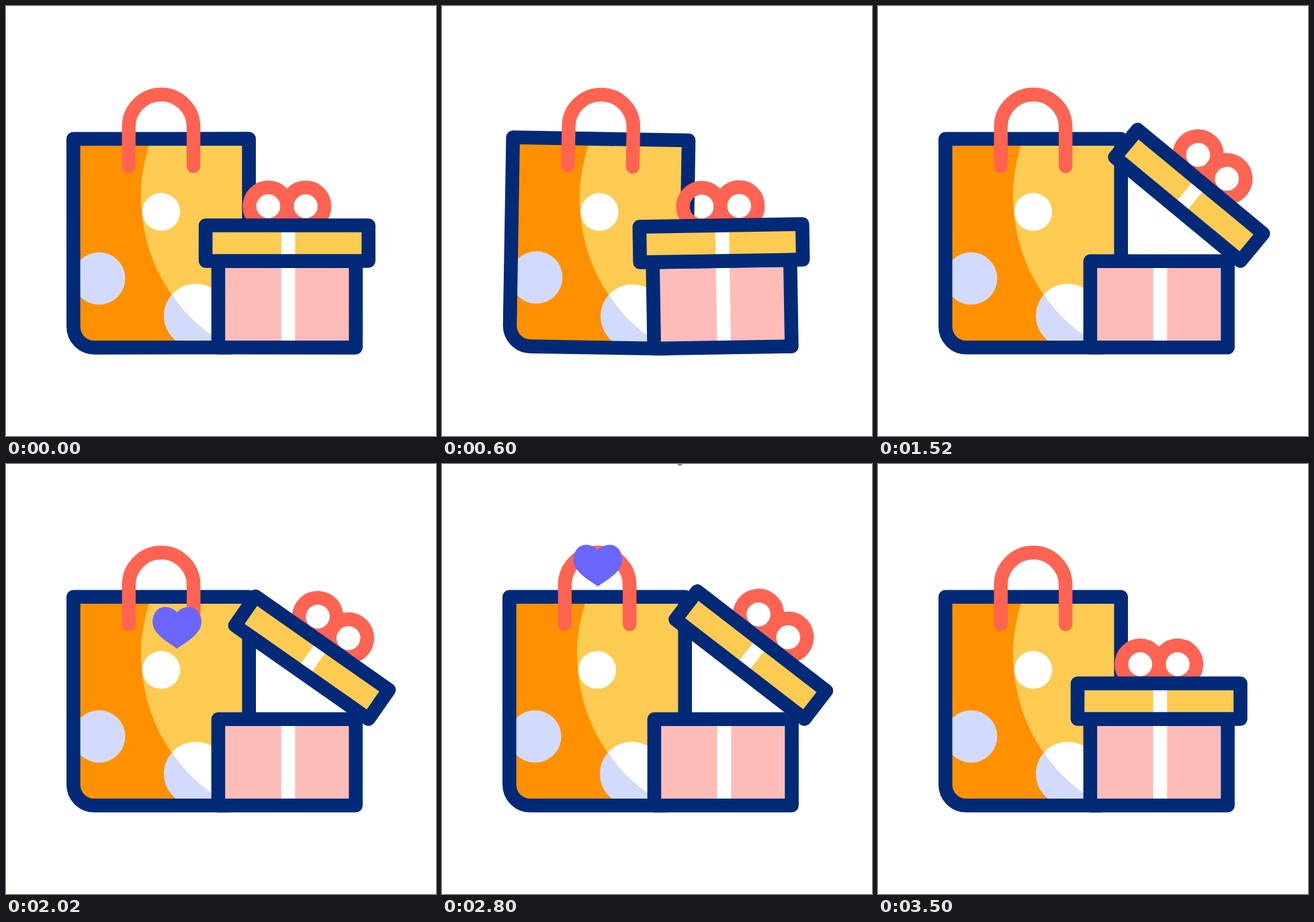
An HTML page that plays this animation: 640 px wide and 640 px high, repeating every 3.6 s.

```html
<!DOCTYPE html>
<html lang="en">
<head>
<meta charset="utf-8">
<title>Shopping bag and gift</title>
<style>
  html, body { margin: 0; width: 100%; height: 100%; overflow: hidden; background: #fff; }
  svg { display: block; width: 100vw; height: 100vh; }
  .line { fill: none; stroke: #002a78; stroke-width: 20.6; stroke-linejoin: round; }
  .coral { fill: none; stroke: #ff6352; stroke-width: 20.4; stroke-linecap: round; }
  .yellow { fill: #fdcb52; }
  .orange { fill: #ff9100; }
  .pink { fill: #fdbcb8; }
  .white { fill: #fff; }
  .pale { fill: #d2dbfd; }
  .heart { fill: #6a66fa; }
</style>
</head>
<body>
<svg viewBox="0 0 640 640">
  <defs>
    <path id="body" d="M100.3 197.7H361.7V477.3a31 31 0 0 1 -31 31H131.3a31 31 0 0 1 -31 -31Z"/>
    <clipPath id="inside"><use href="#body"/></clipPath>
    <clipPath id="shade">
      <path d="M90 190H218C206 228 200 258 201 287C202.500 340 218 390 247 430C263 454 285 477 311 493L345 512V520H90Z"/>
    </clipPath>
    <path id="heart" d="M0 31C-8 25 -24 16 -31 6C-36 0 -37 -8 -36 -13C-34 -25 -26 -31 -18 -31C-11 -31 -4 -28 0 -23C4 -28 11 -31 18 -31C26 -31 34 -25 36 -13C37 -8 36 0 31 6C24 16 8 25 0 31Z"/>
  </defs>

  <g id="bag">
    <g clip-path="url(#inside)">
      <rect class="yellow" x="100" y="197" width="262" height="312"/>
      <circle class="white" cx="282.500" cy="461" r="47.500"/>
      <g clip-path="url(#shade)">
        <rect class="orange" x="90" y="190" width="282" height="330"/>
        <circle class="pale" cx="282.500" cy="461" r="47.500"/>
        <circle class="pale" cx="138.500" cy="405.500" r="39"/>
      </g>
      <circle class="white" cx="231" cy="306.500" r="28.200"/>
    </g>
    <use class="line" href="#body"/>
    <path class="coral" d="M182.800 238.500V180a48.200 48.200 0 0 1 96.400 0V238.500"/>
  </g>

  <g id="hearts"></g>

  <g id="box">
    <rect class="pink" x="316" y="380" width="204" height="128"/>
    <rect class="white" x="409.700" y="380" width="20.600" height="128"/>
    <rect class="line" x="315.900" y="379.700" width="204.700" height="128.600"/>
    <g id="lid">
      <circle class="coral" cx="390.300" cy="298" r="28"/>
      <circle class="coral" cx="446" cy="298" r="28"/>
      <rect class="yellow" x="297" y="327" width="242" height="52"/>
      <rect class="white" x="409.700" y="327" width="20.600" height="52"/>
      <rect class="line" x="297" y="326.500" width="242.500" height="53"/>
    </g>
  </g>
</svg>
<script>
  const LOOP = 3600, RISE = 620, BOTTOM = 440, TOP = -35;
  const get = id => document.getElementById(id);
  const bag = get('bag'), box = get('box'), lid = get('lid');

  // [time, degrees] pairs, joined by straight lines
  const SWAY = [[0, 0], [250, -5], [500, 5], [750, -5], [1000, 5], [1167, 0]];
  const OPEN = [[1167, 0], [1500, 40], [1750, 35], [2667, 35], [2920, 40], [3036, 40], [3500, 0]];

  // Horizontal place of a heart at a given height
  const leftPath = y => 232 + (y - 152) * 0.247 + (y - 152) * (y - 245) * 0.00173;
  const rightPath = y => 354 + (y + 28) * 0.1;

  const hearts = [
    { start: 1765, path: leftPath },
    { start: 2190, path: rightPath },
    { start: 2424, path: leftPath }
  ];
  for (const h of hearts) {
    h.el = document.createElementNS('http://www.w3.org/2000/svg', 'use');
    h.el.setAttribute('href', '#heart');
    h.el.setAttribute('class', 'heart');
    get('hearts').append(h.el);
  }

  function at(keys, t) {
    if (t <= keys[0][0]) return keys[0][1];
    for (let i = 1; i < keys.length; i++) {
      const [t0, a] = keys[i - 1], [t1, b] = keys[i];
      if (t < t1) return a + (b - a) * (t - t0) / (t1 - t0);
    }
    return keys[keys.length - 1][1];
  }

  function turn(el, angle, x, y) {
    el.setAttribute('transform', `rotate(${angle} ${x} ${y})`);
  }

  function draw(t) {
    const sway = at(SWAY, t);
    turn(bag, sway, 231, 518);
    turn(box, -sway, 418, 518);
    turn(lid, at(OPEN, t), 539.5, 379.5);
    for (const { el, start, path } of hearts) {
      const p = (t - start) / RISE;
      const y = BOTTOM + (TOP - BOTTOM) * p;
      el.setAttribute('visibility', p >= 0 && p <= 1 ? 'visible' : 'hidden');
      el.setAttribute('transform', `translate(${path(y)} ${y})`);
    }
  }

  const begin = performance.now();
  function tick() {
    draw((performance.now() - begin) % LOOP);
    requestAnimationFrame(tick);
  }
  tick();
</script>
</body>
</html>
```
